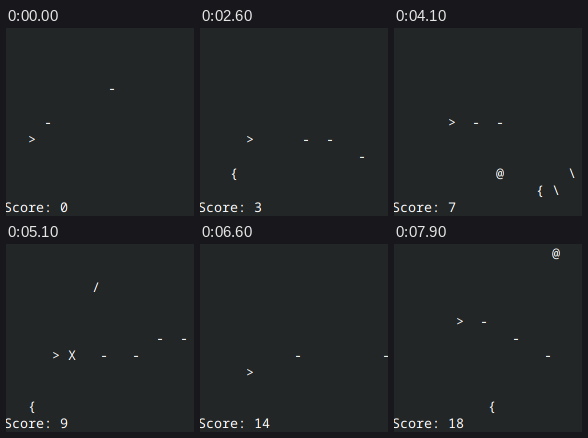
An HTML page with a canvas for the animation above (8000 ms loop, 188 by 188 pixels).

```html
<!DOCTYPE html>
<html lang="en">
<head>
<meta charset="utf-8">
<title>Terminal shooter</title>
<style>
  html, body { margin: 0; width: 100%; height: 100%; overflow: hidden; background: #232627; }
  canvas { display: block; }
</style>
</head>
<body>
<canvas id="screen" width="188" height="188"></canvas>
<script>
const ctx = document.getElementById('screen').getContext('2d');
const CELL_W = 8, CELL_H = 17, LEFT = -2, BASELINE = 14, LAST_COL = 23;
const STEP = 100, STEPS = 80;

// [tick, column, row]: the ship jumps there and stays
const path = [
  [-20, 2, 3], [-7, 0, 5], [0, 3, 6], [3, 4, 6], [6, 5, 6], [7, 6, 6],
  [21, 6, 7], [28, 6, 6], [36, 7, 6], [38, 6, 6], [40, 6, 5], [58, 7, 5],
  [68, 8, 6], [71, 7, 6], [74, 6, 6], [85, 6, 5], [91, 5, 6], [96, 6, 7],
  [104, 7, 6], [108, 9, 6], [111, 8, 5], [114, 7, 4], [117, 8, 4]
];
const shipAt = t => path.findLast(p => p[0] <= t);

// The gun fires three times in ten ticks, except when the ship is moving
const shots = new Map();
for (let n = -3; n <= 35; n++) {
  const born = Math.floor(n * 10 / 3);
  const [moved, col, row] = shipAt(born);
  if (moved !== born) shots.set(n, { born, row, col: t => col + 1 + t - born, end: Infinity });
}

const foes = [], hits = [];
const addFoe = (glyph, born, row, end = Infinity) =>
  foes.push({ glyph, born, row, end, col: t => LAST_COL - (t - born) });

// Shots first..last hit a foe at the given age; divers climb a row every `pace` ticks
function wave(first, last, age, pace) {
  for (let n = first; n <= last; n++) {
    const shot = shots.get(n), t = shot.born + age, col = shot.col(t);
    const climb = now => pace ? Math.ceil((t - now) / pace) : 0;
    shot.end = t;
    hits.push({ t, col, row: shot.row });
    addFoe(pace ? '\\' : '{', t + col - LAST_COL - (pace ? 1 : 0),
      now => Math.min(9, shot.row + climb(now)), t);
  }
}
wave(3, 3, 4);
wave(6, 7, 12);
wave(13, 16, 8);
wave(17, 17, 10, 1);
wave(21, 22, 12);
wave(23, 23, 1, 7.5);
wave(24, 24, 12);
wave(26, 27, 8);
wave(28, 28, 12);
wave(30, 32, 8);

// Foes that slip past
for (const [glyph, born, row] of [['{', 20, 8], ['@', 52, 8], ['{', 57, 9], ['{', 108, 9], ['@', 116, 0]])
  addFoe(glyph, born, () => row);
addFoe('/', 65, t => Math.max(0, Math.floor((t - 73) / 2)));

// Three game ticks per two screen steps, with a short hiccup
const tickAt = step => Math.ceil(step * 1.5) + (step >= 44 && step <= 47 ? 1 : 0);

// Subpixel text: each colour channel sits a third of a pixel apart
const channels = [['#d90000', 1 / 3], ['#00d600', 0], ['#0000d5', -1 / 3]];

function put(text, col, row) {
  for (const [colour, shift] of channels) {
    ctx.fillStyle = colour;
    [...text].forEach((ch, i) =>
      ctx.fillText(ch, LEFT + (col + i) * CELL_W + shift, BASELINE + row * CELL_H));
  }
}

function draw(t) {
  ctx.globalCompositeOperation = 'source-over';
  ctx.fillStyle = '#232627';
  ctx.fillRect(0, 0, 188, 188);
  ctx.globalCompositeOperation = 'lighter';
  ctx.font = '500 13.333px "Noto Sans Mono", monospace';
  ctx.textRendering = 'geometricPrecision';

  const alive = o => t >= o.born && t < o.end;
  for (const s of shots.values()) if (alive(s)) put('-', s.col(t), s.row);
  for (const f of foes) if (alive(f) && f.col(t) >= 0) put(f.glyph, f.col(t), f.row(t));
  for (const h of hits) if (t === h.t) put('X', h.col, h.row);
  const [, col, row] = shipAt(t);
  put('>', col, row);
  put('Score: ' + hits.filter(h => h.t <= t).length, 0, 10);
}

function frame() {
  draw(tickAt(Math.floor(performance.now() / STEP) % STEPS));
  requestAnimationFrame(frame);
}
frame();
</script>
</body>
</html>
```
